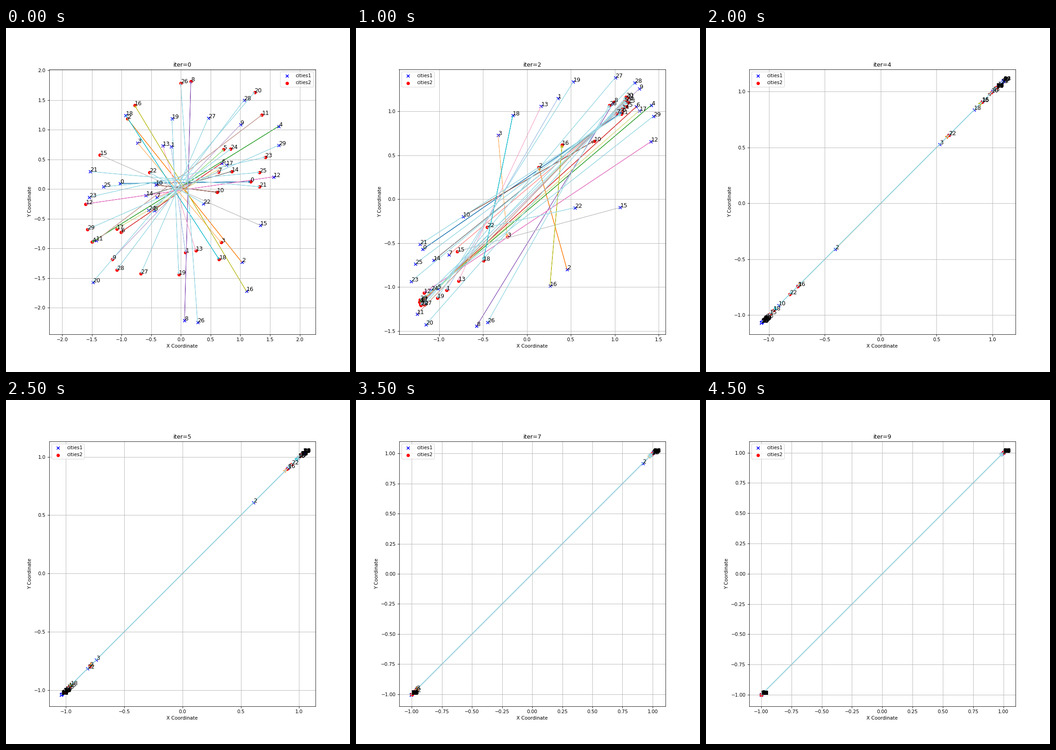
Recreate the animation shown at these times as a matplotlib script. Size 748 by 748 pixels, loop 5 s.

```python
import numpy as np
import matplotlib.pyplot as plt
from matplotlib.animation import FuncAnimation

CITIES, STEPS = 30, 10


def standardize(pts):
    return (pts - pts.mean(axis=0)) / pts.std(axis=0)


def step(pts):
    """Move each city to the average of all, weighted by softmax of distance."""
    dist = np.linalg.norm(pts[:, None] - pts[None], axis=2)
    w = np.exp(dist)
    w /= w.sum(axis=1, keepdims=True)
    return standardize(w @ pts)


np.random.seed(1234)
path = [standardize(np.random.rand(CITIES, 2))]
for _ in range(STEPS):
    path.append(step(path[-1]))

fig, ax = plt.subplots(figsize=(10, 10), dpi=74.8)


def draw(k):
    ax.clear()
    ax.set_aspect("equal", adjustable="datalim")
    a, b = path[k], path[k + 1]
    ax.scatter(a[:, 0], a[:, 1], c="blue", marker="x", label="cities1")
    ax.scatter(b[:, 0], b[:, 1], c="red", marker="o", label="cities2")
    for i, (p, q) in enumerate(zip(a, b)):
        ax.arrow(*p, *(q - p), color=plt.cm.tab20(i), head_width=0.03,
                 head_length=0.03, length_includes_head=True)
        ax.text(*p, str(i), fontsize=12)
        ax.text(*q, str(i), fontsize=12)
    ax.set_title(f"iter={k}")
    ax.set_xlabel("X Coordinate")
    ax.set_ylabel("Y Coordinate")
    ax.legend(loc="upper right" if k < 2 else "upper left")
    ax.grid(True)
    return []


anim = FuncAnimation(fig, draw, frames=STEPS, init_func=lambda: [],
                     interval=500, repeat=True, repeat_delay=0)
plt.show()
```
